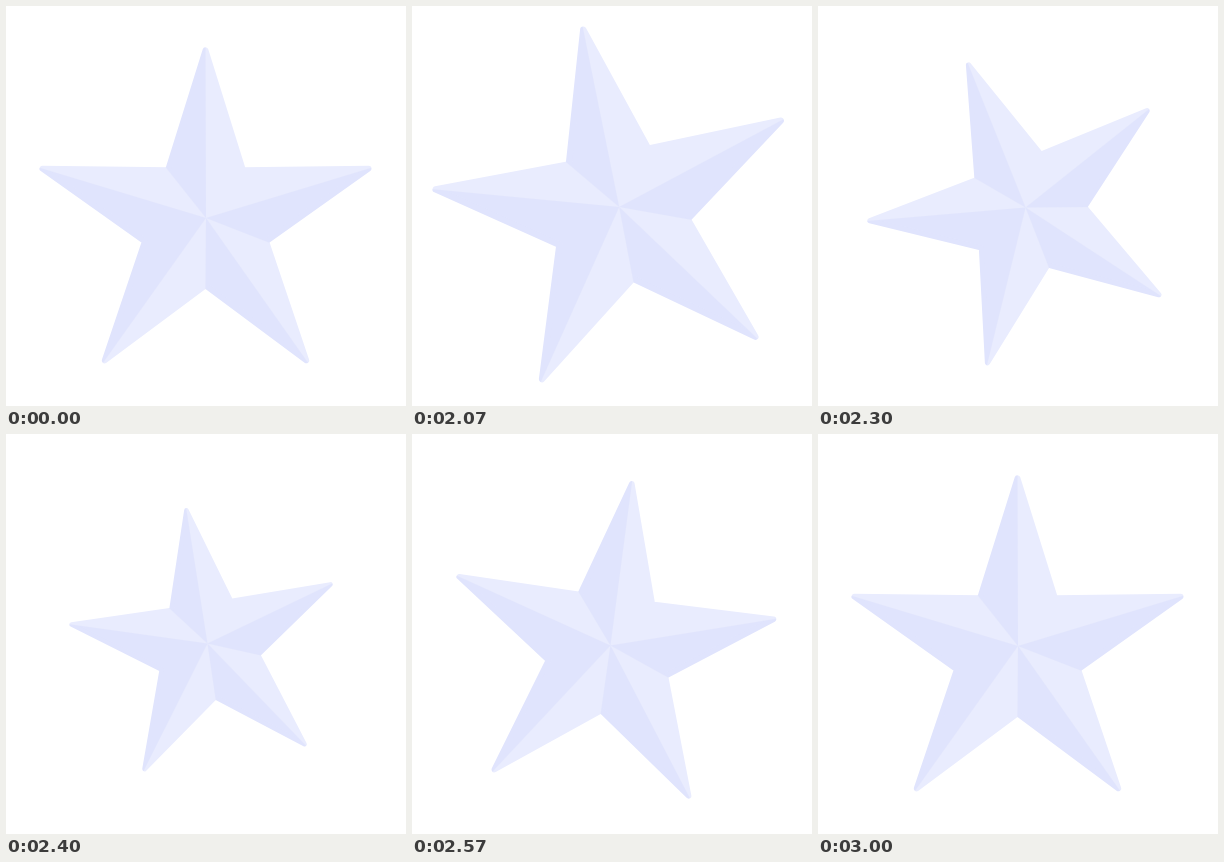
Recreate the animation shown at these times as an HTML page with a canvas. Size 400 by 400 pixels, loop 3020 ms.

```html
<!DOCTYPE html>
<html lang="en">
<head>
<meta charset="utf-8">
<title>Star</title>
<style>
  html, body { margin: 0; height: 100%; overflow: hidden; background: #fff; }
  canvas { display: block; width: 400px; height: 400px; }
</style>
</head>
<body>
<canvas width="400" height="400"></canvas>
<script>
const ctx = document.querySelector('canvas').getContext('2d');
const LOOP = 3020, REST = 2000, STEP = 25;
const LIGHT = '#e9ecfe', DARK = '#e0e4fd';
const RAD = Math.PI / 180;
const MID = 200, HUB_Y = 212;

// Even corners are tips, odd corners are notches.
function corner(i) {
  const angle = (i * 36 - 90) * RAD, r = i % 2 ? 63.8 : 171.5;
  return [199.5 + r * Math.cos(angle), 215.7 + r * Math.sin(angle)];
}

// Facets overshoot the outline and are trimmed to it while painting.
function beyond(i) {
  const [x, y] = corner(i);
  return [MID + (x - MID) * 1.15, HUB_Y + (y - HUB_Y) * 1.15];
}

function fillShape(points) {
  ctx.beginPath();
  points.forEach(p => ctx.lineTo(...p));
  ctx.closePath();
  ctx.fill();
}

function drawStar() {
  ctx.fillStyle = ctx.strokeStyle = DARK;
  ctx.lineWidth = 5.8;
  ctx.lineJoin = 'round';
  fillShape(Array.from({ length: 10 }, (_, i) => corner(i)));
  ctx.stroke();

  ctx.globalCompositeOperation = 'source-atop';
  ctx.fillStyle = LIGHT;
  for (const lit of ['012', '34', '56', '89']) {
    fillShape([[MID, HUB_Y], ...[...lit].map(i => beyond(+i))]);
  }
}

// Runs from 0 to 1 between two times, slow at both ends.
function ease(t, from, to) {
  const p = Math.min(1, Math.max(0, (t - from) / (to - from)));
  return (1 - Math.cos(Math.PI * p)) / 2;
}

function draw(t) {
  const hop = ease(t, 0, 145) - ease(t, 170, 400);
  const size = 1 + 0.103 * ease(t, 0, 110) - 0.3 * ease(t, 160, 400) + 0.197 * ease(t, 400, 632);
  // Wind up to the left, swing over, then settle.
  const spin = -29 * ease(t, 0, 175) + 37 * ease(t, 175, 600)
    - 10.8 * ease(t, 600, 715) + 2.8 * ease(t, 715, 1000);

  ctx.clearRect(0, 0, 400, 400);
  ctx.save();
  ctx.translate(MID + 8.8 * hop, MID - 22 * hop);
  ctx.rotate(spin * RAD);
  ctx.scale(size, size);
  ctx.translate(-MID, -MID);
  drawStar();
  ctx.restore();
}

function frame() {
  // 40 poses per second, each starting on a whole hundredth.
  const ticks = Math.floor((performance.now() % LOOP - REST) / 10);
  const pose = Math.ceil((ticks + 1) * 10 / STEP) - 1;
  draw(Math.max(0, pose) * STEP);
  requestAnimationFrame(frame);
}
frame();
</script>
</body>
</html>
```
